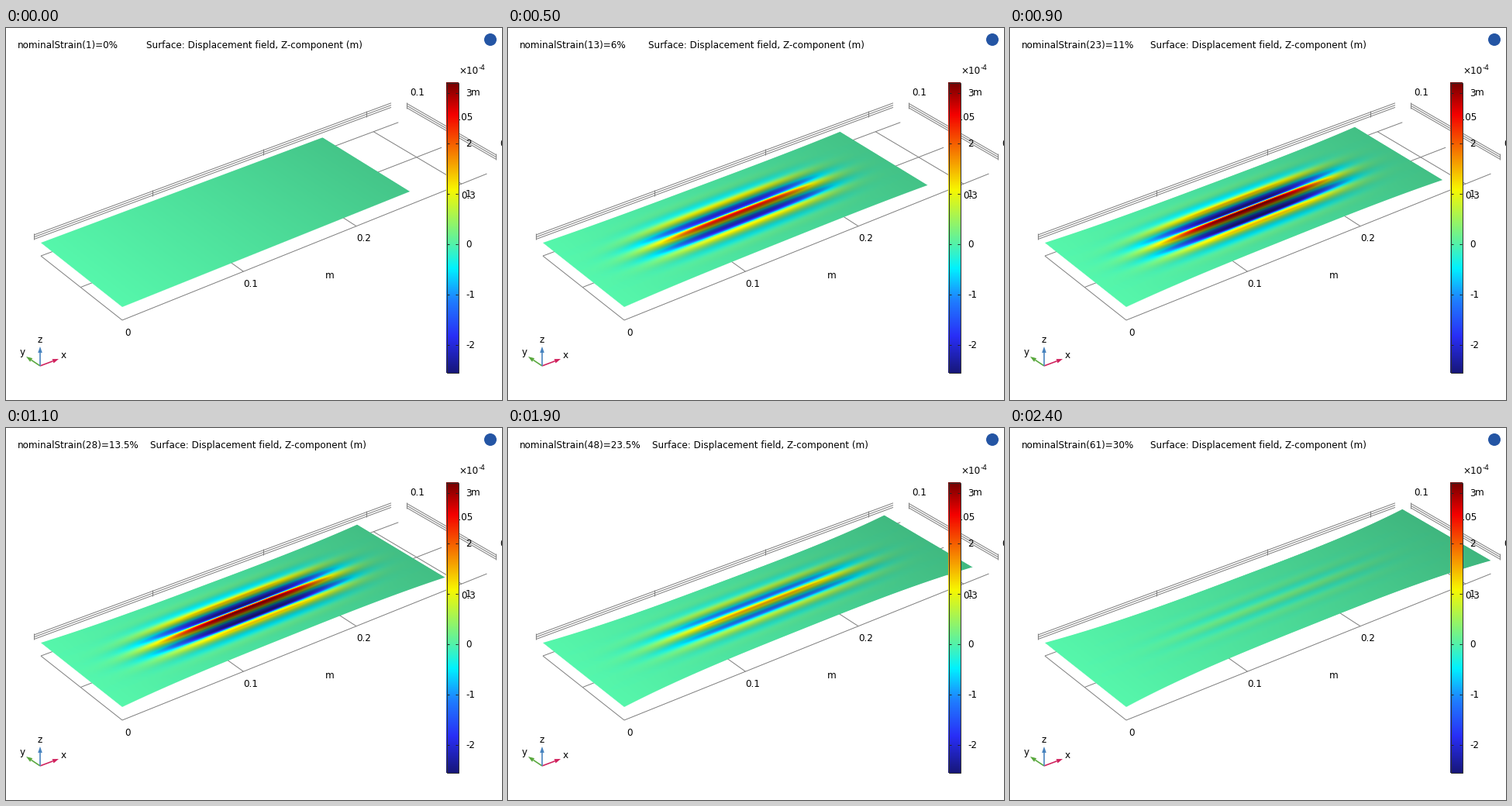
A matplotlib script that plays this animation: 640 px wide and 480 px high, repeating every 2500 ms.

```python
import numpy as np
import matplotlib.pyplot as plt
from matplotlib.animation import FuncAnimation
from matplotlib.colors import LinearSegmentedColormap
from matplotlib.patches import Circle, Polygon, Rectangle

W, H, DPI = 640, 480, 100
PT = 72 / DPI                      # points per pixel
FRAMES, INTERVAL = 25, 100
LENGTH, WIDTH, REACH = 0.25, 0.1, 0.325
Z_MIN, Z_MAX = -2.55, 3.2          # in 1e-4 m
PITCH = 0.19                       # wrinkle spacing across the sheet
LIFT = 0.0225                      # largest upward shift of a crest, same unit
GREY = "#808080"

plt.rcParams["font.family"] = "DejaVu Sans"
rainbow = LinearSegmentedColormap.from_list("rainbow", [
    (0, (0.09, 0.09, 0.48)), (0.125, (0.16, 0.18, 0.97)), (0.25, (0.12, 0.50, 1)),
    (0.36, (0, 0.95, 1)), (0.444, (0.33, 0.95, 0.66)), (0.63, (0.97, 0.97, 0)),
    (0.89, (0.96, 0, 0)), (1, (0.46, 0, 0)),
], N=512)

fig = plt.figure(figsize=(W / DPI, H / DPI), dpi=DPI, facecolor="white")
ax = fig.add_axes([0, 0, 1, 1])
ax.axis("off")


def line(p, q, color=GREY, width=1, z=1):
    ax.plot([p[0], q[0]], [p[1], q[1]], color=color, lw=width * PT, zorder=z,
            solid_capstyle="butt")


def label(x, y, s, size=12, ha="center", z=6):
    """Text whose capitals are centred on y."""
    return ax.text(x, y + 0.365 * size, s, fontsize=size * PT, ha=ha,
                   va="baseline", color="black", zorder=z)


def fit_homography(pairs):
    rows, rhs = [], []
    for x, y, px, py in pairs:
        rows += [[x, y, 1, 0, 0, 0, -x * px, -y * px],
                 [0, 0, 0, x, y, 1, -x * py, -y * py]]
        rhs += [px, py]
    sol = np.linalg.lstsq(np.array(rows), np.array(rhs), rcond=None)[0]
    return np.append(sol, 1).reshape(3, 3)


# Sheet plane (metres) to screen
PLANE = fit_homography([
    (0, 0, 150, 360), (0, .1, 45, 277), (.25, 0, 521, 211), (.25, .1, 408.5, 141),
    (REACH, 0, 620.5, 171), (REACH, .1, 507, 105), (.1, 0, 306.5, 297.5),
    (.2, 0, 452, 238.5), (.3, .1, 473.5, 117), (REACH, .05, 562, 137),
])


def floor(x, y):
    a, b, c = PLANE @ (x, y, 1)
    return a / c, b / c + 17


# Every pixel back onto the sheet plane
px, py = np.meshgrid(np.arange(W) + .5, np.arange(H) + .5)
back = np.linalg.inv(PLANE) @ np.stack([px.ravel(), py.ravel(), np.ones(W * H)])
X, Y = (back[:2] / back[2]).reshape(2, H, W)


def amplitude(strain):
    """Wrinkle height: grows after a threshold, then irons out again."""
    onset, end, p, q = 2, 32, 0.7, 1.5
    if strain <= onset:
        return 0.0
    peak = (end - onset) * p / (p + q)
    s = strain - onset
    return (s / peak) ** p * ((end - strain) / (end - onset - peak)) ** q


def sheet(strain):
    e = strain / 100
    u = X / (LENGTH * (1 + e))
    d = np.clip(np.abs(2 * u - 1), 0, 1)
    neck = (1 - (1 + e) ** -0.67) * (1 - d ** 3)
    v = 0.5 + (Y / WIDTH - 0.5) / (1 - neck)

    along = amplitude(strain) * np.exp(-(d / 0.54) ** 3)
    seen = np.clip((v - 0.5) / PITCH, -3, 3)
    r = seen
    # Crests are lifted on screen, so find the material point behind each pixel
    for _ in range(12):
        env = along * np.exp(-r ** 2 / 1.12)
        r = 0.5 * r + 0.5 * (seen - LIFT / PITCH * env * np.cos(2 * np.pi * r))
    z = Z_MAX * env * np.cos(2 * np.pi * r)
    slope = -env * np.sin(2 * np.pi * r)

    light = np.minimum(1 - 0.6 * slope, 1.15)      # lit from behind
    shade = (1.02 - 0.82 * np.clip(X, 0, 0.4)) * light
    rgba = rainbow(np.clip((z - Z_MIN) / (Z_MAX - Z_MIN), 0, 1))
    rgba[..., :3] = np.clip(rgba[..., :3] * shade[..., None], 0, 1)
    rgba[..., 3] = (np.clip(.5 + 107 * np.minimum(v, 1 - v), 0, 1)
                    * np.clip(.5 + 322 * (1 + e) * np.minimum(u, 1 - u), 0, 1))
    return rgba


# Floor grid
for y in (0, .05, .1):
    line(floor(0, y), floor(REACH, y))
for x in (0, .1, .2, .3):
    line(floor(x, 0), floor(x, .1))

# Edge-on back walls
for dy in (0, 2.8, 5.6):
    line((36, 267 + dy), (497, 96.8 + dy))
    line((517, 97.3 + dy), (632, 163.5 + dy))
for x, y in ((36, 265), (188.5, 209), (331.5, 156), (465, 107), (517, 96), (632, 162)):
    line((x, y), (x, y + 8))

surface = ax.imshow(sheet(0), extent=(0, W, H, 0), interpolation="nearest", zorder=3)

for x, y, s in ((156.5, 393, "0"), (316, 329.5, "0.1"), (461.5, 271, "0.2"), (597, 216, "0.3"),
                (418, 318.5, "m"), (530.5, 83, "0.1"), (589, 115, "0.05"),
                (641, 149, "0"), (605.5, 83, "m")):
    label(x, y, s, z=4)

# Colour bar
ax.imshow(np.linspace(1, 0, 374)[:, None], cmap=rainbow, extent=(568, 584, 445, 70),
          aspect="auto", zorder=5)
for n in range(-2, 4):
    y = 278.5 - 65 * n
    line((569, y), (572, y), "#222222", z=6)
    line((580, y), (583, y), "#222222", z=6)
    label(593, y, str(n), ha="left")
ax.add_patch(Rectangle((568.5, 70.5), 15, 374, fill=False, ec="#333333", lw=PT, zorder=6))
label(584.5, 55, "×10", ha="left")
label(610, 50.5, "-4", size=9, ha="left")


# Axis triad
def arrow(tip, color, name, at):
    o, t = np.array((44.0, 436.0)), np.array(tip, float)
    d = (t - o) / np.hypot(*(t - o))
    n = np.array((-d[1], d[0]))
    base = t - 8 * d
    line(o, base, color, 1.6, 6)
    ax.add_patch(Polygon([t, base + 2.8 * n, base - 2.8 * n], fc=color, ec="none", zorder=6))
    label(*at, name)


arrow((68, 427), "#d0205c", "x", (74.5, 422))
arrow((26, 424), "#58a83c", "y", (21.5, 417.5))
arrow((44, 411), "#4682be", "z", (44, 402))

ax.add_patch(Circle((625, 15), 8, fc="#2455a4", ec="none", zorder=6))

step_text = label(15, 21.5, "", ha="left")
title = label(181, 21.5, "Surface: Displacement field, Z-component (m)", ha="left")

ax.set_aspect("auto")
ax.set_xlim(0, W)
ax.set_ylim(H, 0)


def update(i):
    step = int(1 + 2.5 * i)
    strain = (step - 1) / 2
    text = f"nominalStrain({step})={strain:g}%"
    step_text.set_text(text)
    title.set_x(186 if len(text) > 22 else 181)
    surface.set_data(sheet(strain))
    return surface, step_text, title


anim = FuncAnimation(fig, update, frames=FRAMES, interval=INTERVAL,
                     repeat=True, repeat_delay=0, blit=False)
plt.show()
```
